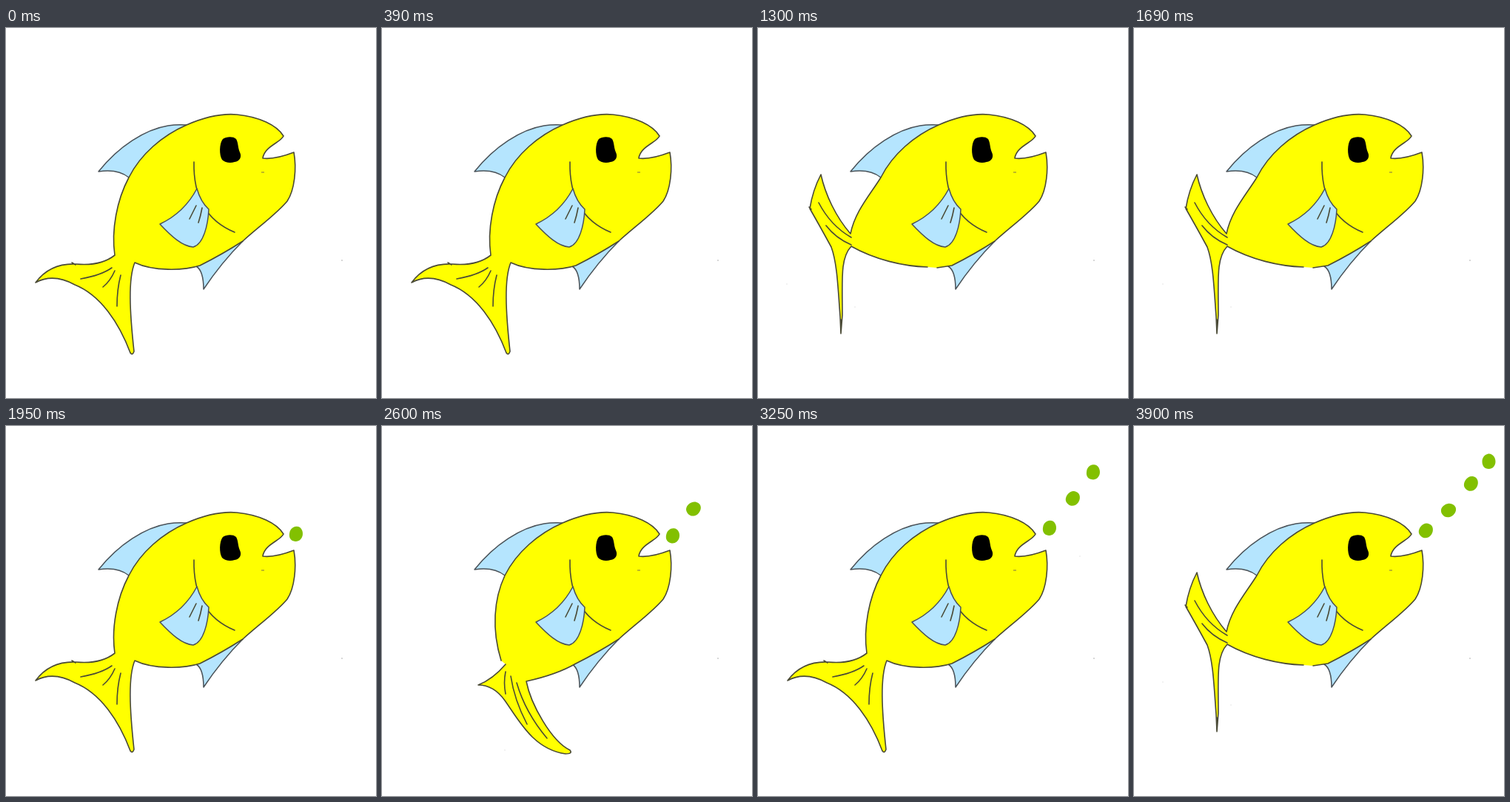
An HTML page that plays this animation: 500x500 px, repeating every 4550 ms.

```html
<!DOCTYPE html>
<html lang="en">
<head>
<meta charset="utf-8">
<title>Fish</title>
<style>
html, body { margin: 0; width: 100%; height: 100%; overflow: hidden; background: #fff; }
svg { display: block; width: 100%; height: 100%; }
.ink { fill: none; stroke: #4a4a36; stroke-width: 1.6; stroke-linecap: round; stroke-linejoin: round; }
.fin { fill: #b5e5fe; stroke: #4a5258; stroke-width: 1.5; stroke-linejoin: round; }
.skin { fill: #ff0; }
.speck { fill: #c4c4c4; }
</style>
</head>
<body>
<svg viewBox="0 0 500 500">
  <path class="fin" d="M244 131Q231 130 219 132C188 137 152 160 125 194Q151 190 166 202L200 170Z"/>
  <path class="fin" d="M320 288Q291 317 267 353Q267 328 257 322L285 306Z"/>
  <g id="poses"></g>
  <path class="ink" d="M254 181C253 227 270 260 309 276"/>
  <path class="fin" d="M258 217C246 240 227 256 208 265C223 281 238 295 253 296C267 292 273 266 274 245Q263 235 258 217Z"/>
  <path class="ink" d="M257 240L248 258M265 243Q263 254 260 263"/>
  <path d="M293 150C298 147 306 146 311 150C314 155 313 161 316 168C319 174 316 180 309 181C303 183 296 182 292 178C288 172 288 156 293 150Z"/>
  <path d="M345 195h4" stroke="#a8a030" stroke-width="1.5"/>
  <g id="bubbles" fill="#82c000"></g>
  <g id="specks" class="speck"><circle cx="454" cy="314" r=".9"/></g>
</svg>
<script>
const STEP = 650;
const NS = 'http://www.w3.org/2000/svg';
const $ = id => document.getElementById(id);

const head = 'M166 202C182 170 212 145 244 131C267 121 289 115 312 117' +
  'C342 120 366 131 375 146C371 155 349 160 347 176Q363 178 389 168' +
  'C393 190 390 219 380 234C366 251 342 268 320 288Q292 306 262 321';

// Each rear is the contour that closes the head, as [drawn, undrawn, drawn, ...] pieces.
const poses = [
  {
    rear: ['C240 328 199 329 174 317C165 339 167 382 173 437Q171 443 168 439' +
      'C153 399 128 361 93 347Q64 331 40 344C54 325 72 318 95 319Q128 322 147 307C142 273 150 232 166 202'],
    rays: 'M101 339Q129 334 143 324M147 328Q141 342 131 350M155 334Q150 353 150 376M89 317l5 3'
  },
  {
    rear: ['Q236 336 195 345C201 376 229 426 254 438Q258 443 248 443' +
      'C204 437 184 396 166 371Q151 350 130 350Q150 342 167 322', 'L161 317', 'C148 275 151 234 166 202'],
    rays: 'M167 332Q164 347 167 362M174 338C178 365 186 384 196 403M182 347C191 378 207 403 223 422',
    specks: [[166, 438]]
  },
  {
    rear: ['L242 324', 'L229 323', 'C196 322 158 313 126 295C111 311 114 339 114 388L112 413L111 390' +
      'C108 350 107 318 99 296Q86 272 70 244Q74 219 85 198C91 225 105 255 125 278C131 248 151 226 166 202'],
    rays: 'M82 236Q98 267 126 283M92 267Q105 284 126 293M69 242l3 3M112 394v19',
    specks: [[39, 346], [131, 377]]
  }
];

// each bubble: x, y, tilt
const scenes = [
  { pose: 0 },
  { pose: 1 },
  { pose: 2 },
  { pose: 0, bubbles: [[392, 146, 12]] },
  { pose: 1, bubbles: [[393, 148.5, 15], [421, 112, 50]] },
  { pose: 0, bubbles: [[394, 138, 12], [425.5, 98, 35], [453, 62.5, 10]], specks: [[435, 176]] },
  { pose: 2, bubbles: [[394.5, 141.5, 35], [425, 114, 60], [455.5, 78, 30], [479.5, 48, 0]] }
];

function add(parent, tag, attrs) {
  const el = document.createElementNS(NS, tag);
  for (const k in attrs) el.setAttribute(k, attrs[k]);
  return parent.appendChild(el);
}

const poseEls = poses.map(({ rear, rays }) => {
  const g = add($('poses'), 'g', {});
  const outline = rear.map((d, i) => i % 2 ? d.replace('L', 'M') : d).join('');
  add(g, 'path', { class: 'skin', d: head + rear.join('') + 'Z' });
  add(g, 'path', { class: 'ink', d: head + outline + rays });
  return g;
});

const sceneEls = scenes.map(s => {
  const bubbles = add($('bubbles'), 'g', {});
  for (const [x, y, tilt] of s.bubbles || [])
    add(bubbles, 'path', {
      d: 'M-2-10C4-12 9-6 9 0C9 6 5 10 0 10C-6 10-9 6-9 0C-9-5-6-9-2-10Z',
      transform: `translate(${x} ${y}) rotate(${tilt})`
    });
  const specks = add($('specks'), 'g', {});
  for (const [x, y] of [...(s.specks || []), ...(poses[s.pose].specks || [])])
    add(specks, 'circle', { cx: x, cy: y, r: 0.7, opacity: 0.6 });
  return [bubbles, specks];
});

const show = (el, on) => { el.style.display = on ? '' : 'none'; };

function draw(now) {
  const n = Math.floor(now / STEP) % scenes.length;
  poseEls.forEach((el, i) => show(el, i === scenes[n].pose));
  sceneEls.forEach((els, i) => els.forEach(el => show(el, i === n)));
}

let start;
function tick(now) {
  start ??= now;
  draw(now - start);
  requestAnimationFrame(tick);
}
draw(0);
requestAnimationFrame(tick);
</script>
</body>
</html>
```
